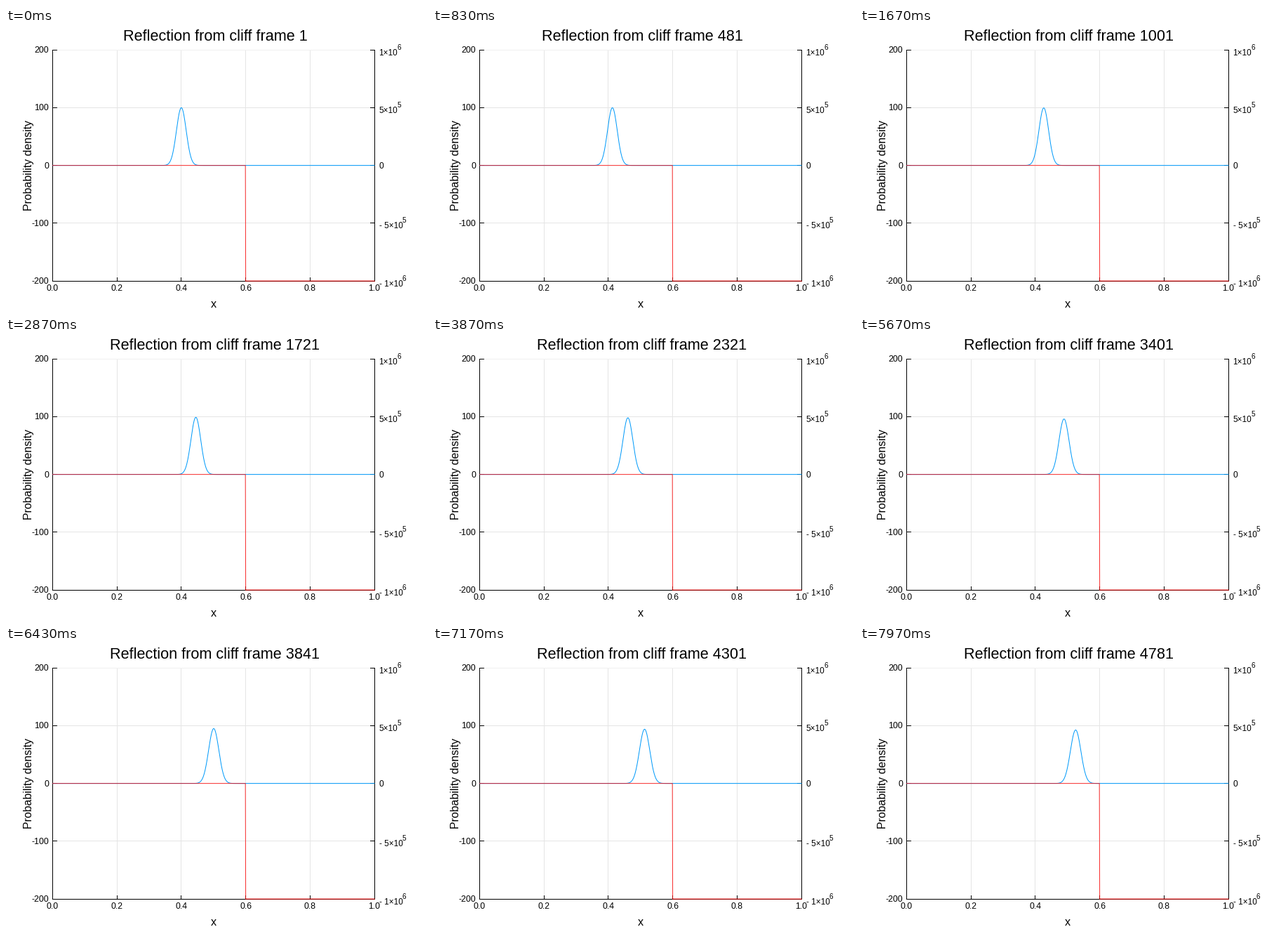
These frames come from a looping animation (600 by 400 pixels, 8 s). A matplotlib script:

```python
import numpy as np
import matplotlib.pyplot as plt
from matplotlib.animation import FuncAnimation

W, H, DPI = 600, 400, 100
PT = 72 / DPI
FRAMES, LOOP = 240, 8000
STEP = 20                  # simulation steps between pictures

# Wave packet: start, drift per frame, initial width, dispersion time
X0, SPEED, SIGMA, SPREAD = 0.4, 0.000524, 0.0151, 586
CLIFF = 0.6

plt.rcParams["font.family"] = "Liberation Sans"
plt.rcParams["path.snap"] = False
fig = plt.figure(figsize=(W / DPI, H / DPI), dpi=DPI, facecolor="white")
ax = fig.add_axes([0, 0, 1, 1])
ax.set_xlim(0, W)
ax.set_ylim(H, 0)
ax.axis("off")


def px(x):
    return 66.4 + 458.7 * x


def py(v):
    return 195.65 - 0.822 * v


def line(xs, ys, color="black", width=1, **kw):
    return ax.plot(xs, ys, color=color, lw=width * PT, **kw)[0]


def rule(xs, ys, color="black", zorder=2):
    """Straight line centred on whole pixels."""
    line(np.floor(xs) + 0.5, np.floor(ys) + 0.5, color, zorder=zorder,
         solid_capstyle="projecting")


def label(x, y, s, size, ha="center", **kw):
    return ax.text(x, y, s, fontsize=size * PT, ha=ha, va="baseline",
                   color="black", **kw)


def power_label(y, mantissa, exponent):
    base = label(531.5, y + 7.5, mantissa + "×10", 11.7, "left")
    box = base.get_window_extent(fig.canvas.get_renderer())
    label(box.x1 - 0.5, y - 0.5, exponent, 10, "left")


left, right, top, bottom = px(0), px(1), py(200), py(-200)

# Grid
for x in (0.2, 0.4, 0.6, 0.8):
    rule([px(x)] * 2, [top, bottom], "#e5e5e5", 1)
for v in (-100, 0, 100, 200):
    rule([left, right], [py(v)] * 2, "#e5e5e5" if v < 200 else "#f0f0f0", 1)

# Axes and ticks
for x in (left, right):
    rule([x, x], [top, bottom])
rule([left, right], [bottom, bottom])
for x in np.linspace(0, 1, 6):
    rule([px(x)] * 2, [bottom, bottom - 5])
    label(px(x), 374.5, f"{x:.1f}", 12.2)
for v in range(-200, 201, 100):
    y = py(v)
    rule([left, left + 6], [y, y])
    rule([right - 6, right], [y, y])
    label(61, y + 4, str(v), 12.4, "right")

power_label(py(200), "1", "6")
power_label(py(100), "5", "5")
label(531, py(0) + 4, "0", 12, "left")
power_label(py(-100), "- 5", "5")
power_label(py(-200), "- 1", "6")

label(296, 398, "x", 16.1)
label(36.5, 195.5, "Probability density", 15.9, rotation=90,
      rotation_mode="anchor")
title = label(298, 18, "", 21.6)

# Density curve, with the potential drawn over it
xs = np.linspace(0, 1, 1001)
wave = line(px(xs), py(0 * xs), "#009afa", zorder=3)
potential = np.where(xs < CLIFF - 1e-9, 0, -200)
line(px(xs), py(potential), "#ff0000", alpha=0.8, zorder=4)
rule([edge := px(CLIFF), right], [bottom, bottom], "#900000", 5)


def density(i):
    grow = 1 + (i / SPREAD) ** 2
    center = X0 + SPEED * i
    return 100 / np.sqrt(grow) * np.exp(-(xs - center) ** 2
                                        / (2 * SIGMA ** 2 * grow))


def draw(i):
    wave.set_ydata(py(density(i)))
    title.set_text(f"Reflection from cliff frame {1 + STEP * i}")
    return wave, title


anim = FuncAnimation(fig, draw, frames=FRAMES, interval=LOOP / FRAMES,
                     repeat=True, repeat_delay=0)
plt.show()
```
